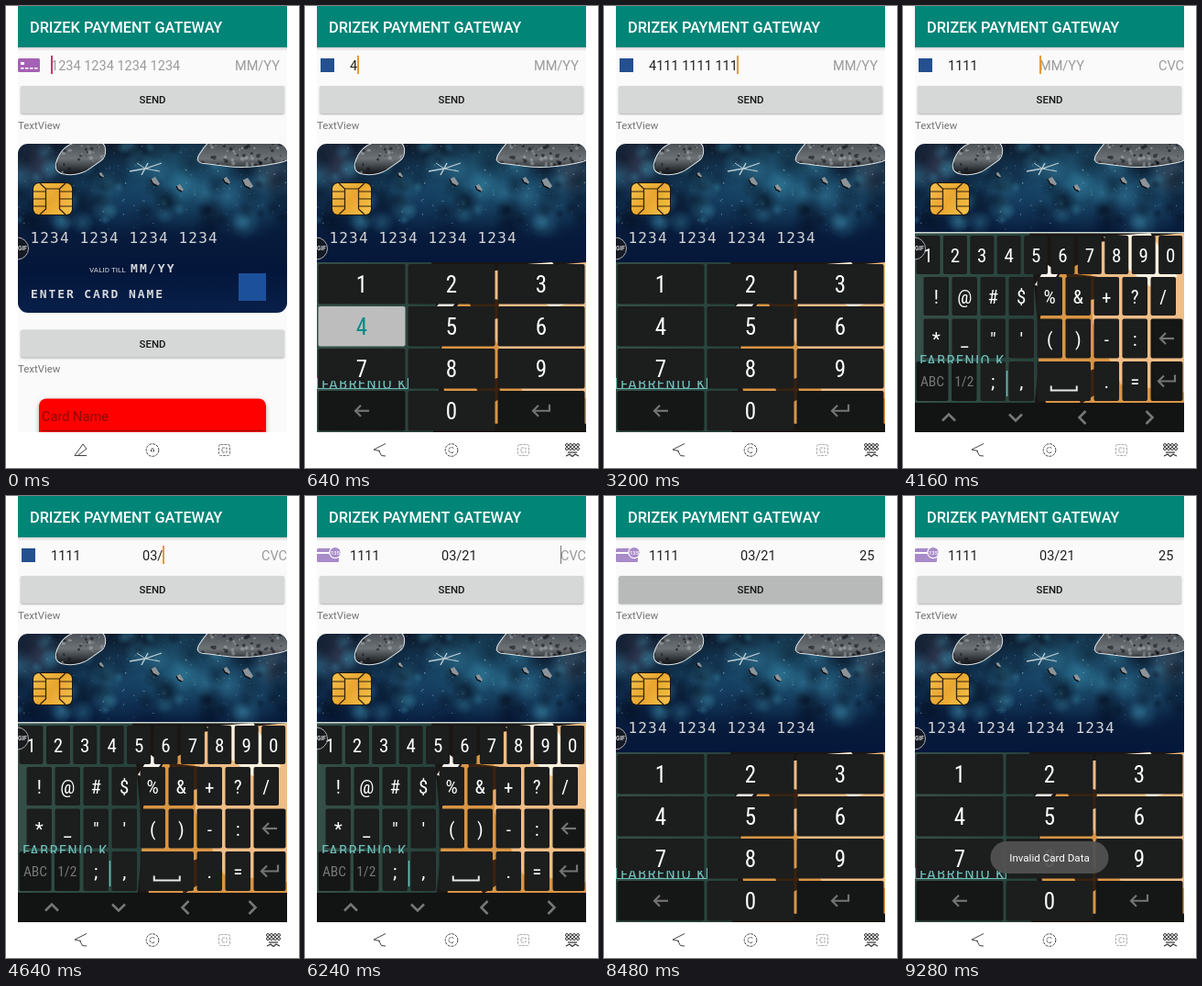
Animation of 320x503 px, one loop 9600 ms. Source, as an HTML page with a canvas:

```html
<!DOCTYPE html>
<html lang="en">
<head>
<meta charset="utf-8">
<title>Payment form</title>
<style>
html, body { margin: 0; width: 100%; height: 100%; overflow: hidden; background: #fff; }
canvas { display: block; width: 100%; height: 100%; }
</style>
</head>
<body>
<canvas id="stage"></canvas>
<script>
const W = 320, H = 503, LOOP = 9600, LEFT = 13, RIGHT = 307, NAV = 464;
const canvas = document.getElementById('stage');
const ctx = canvas.getContext('2d');
const SANS = 'Roboto, "Open Sans", sans-serif';
const NARROW = '"Roboto Condensed", Roboto, sans-serif';
const MONO = '"DejaVu Sans Mono", "Liberation Mono", monospace';
const PINK = '#d0316f', ORANGE = '#e39a35', GRAY = '#777';

// Each step patches the state from its time onwards.
const steps = [
  [0, { icon: 'card', num: '', date: '', cvc: '', field: 'num', caret: PINK, slide: 0, kb: '', lift: 0, key: '', send: false, toast: 0 }],
  [160, { kb: 'num', lift: 0.5 }],
  [320, { lift: 1 }],
  [640, { icon: 'brand', caret: ORANGE, num: '4', key: '4' }],
  [960, { key: '' }],
  [1120, { num: '41', key: '1' }],
  [1440, { num: '411', key: '' }],
  [1760, { num: '4111' }],
  [1920, { num: '4111 ' }],
  [2240, { num: '4111 1', key: '1' }],
  [2400, { num: '4111 11', key: '' }],
  [2560, { num: '4111 111', key: '1' }],
  [2880, { num: '4111 1111 1', key: '' }],
  [3040, { num: '4111 1111 11', key: '1' }],
  [3200, { num: '4111 1111 111', key: '' }],
  [3520, { num: '4111 1111 1111 1', key: '1' }],
  [3680, { num: '4111 1111 1111 11', key: '' }],
  [3840, { num: '4111 1111 1111 111', key: '1' }],
  [4000, { num: '4111 1111 1111 1111', key: '', field: 'date', slide: 0.6 }],
  [4160, { slide: 1, kb: 'sym' }],
  [4320, { date: '0', key: '0' }],
  [4480, { date: '03/', key: '3' }],
  [4640, { key: '' }],
  [5440, { caret: '' }],
  [5920, { caret: ORANGE, date: '03/2', key: '2' }],
  [6080, { date: '03/21', key: '1' }],
  [6240, { icon: 'cvc', field: 'cvc', caret: GRAY, key: '' }],
  [6560, { kb: 'num', lift: 0.75 }],
  [6720, { lift: 1 }],
  [7040, { caret: '' }],
  [7680, { caret: GRAY, cvc: '2', key: '2' }],
  [7840, { key: '' }],
  [8000, { cvc: '25', key: '5' }],
  [8160, { key: '' }],
  [8320, { caret: '' }],
  [8480, { send: true }],
  [8640, { send: false }],
  [8800, { toast: 0.3 }],
  [8960, { toast: 0.6 }],
  [9120, { toast: 0.85 }],
  [9280, { toast: 1 }]
];

function stateAt(t) {
  const s = {};
  for (const [at, patch] of steps) if (at <= t) Object.assign(s, patch);
  return s;
}

function rect(x, y, w, h, fill, r = 0) {
  ctx.fillStyle = fill;
  ctx.beginPath();
  ctx.roundRect(x, y, w, h, r);
  ctx.fill();
}

function text(str, x, y, size, color, { weight = 400, font = SANS, align = 'left', gap = 0 } = {}) {
  ctx.font = `${weight} ${size}px ${font}`;
  ctx.letterSpacing = gap + 'px';
  ctx.textAlign = align;
  ctx.fillStyle = color;
  ctx.fillText(str, x, y);
  return ctx.measureText(str).width;
}

function trace(pts, close) {
  ctx.beginPath();
  for (let i = 0; i < pts.length; i += 2) ctx.lineTo(pts[i], pts[i + 1]);
  if (close) ctx.closePath();
}

function poly(fill, ...pts) {
  trace(pts, true);
  ctx.fillStyle = fill;
  ctx.fill();
}

function line(color, width, ...pts) {
  trace(pts);
  ctx.strokeStyle = color;
  ctx.lineWidth = width;
  ctx.stroke();
}

function circle(x, y, r, fill, stroke, width = 1) {
  ctx.beginPath();
  ctx.arc(x, y, r, 0, Math.PI * 2);
  if (fill) { ctx.fillStyle = fill; ctx.fill(); }
  if (stroke) { ctx.strokeStyle = stroke; ctx.lineWidth = width; ctx.stroke(); }
}

function clipped(x, y, w, h, r, draw) {
  ctx.save();
  ctx.beginPath();
  ctx.roundRect(x, y, w, h, r);
  ctx.clip();
  draw();
  ctx.restore();
}

function gradient(x0, y0, x1, y1, ...colors) {
  const g = ctx.createLinearGradient(x0, y0, x1, y1);
  colors.forEach((c, i) => g.addColorStop(i / (colors.length - 1), c));
  return g;
}

function glow(x, y, r, rgb, alpha) {
  const g = ctx.createRadialGradient(x, y, 0, x, y, r);
  g.addColorStop(0, `rgba(${rgb},${alpha})`);
  g.addColorStop(1, `rgba(${rgb},0)`);
  ctx.fillStyle = g;
  ctx.fillRect(x - r, y - r, r * 2, r * 2);
}

function random(seed) {
  return () => (seed = seed * 16807 % 2147483647) / 2147483647;
}

function button(y, pressed) {
  ctx.save();
  ctx.shadowColor = 'rgba(0,0,0,.3)';
  ctx.shadowBlur = 2;
  ctx.shadowOffsetY = 1;
  rect(16, y, 288, 30, pressed ? '#b8b9b9' : '#d6d7d7', 2);
  ctx.restore();
  text('SEND', 160, y + 19.3, 11.43, '#151515', { weight: 500, align: 'center' });
}

function fieldIcon(kind) {
  if (kind === 'brand') return rect(17, 57, 15, 15, '#24508f');
  if (kind === 'card') {
    rect(13, 57, 24, 15, '#a561b5', 1.5);
    rect(16, 61, 4, 3, '#fff');
    for (let i = 0; i < 4; i++) rect(16 + i * 5, 67, 3.5, 1.6, '#fff');
    return;
  }
  rect(13, 57, 24, 15, '#a88bc9', 1.5);
  rect(13, 61, 24, 2, '#fafafa');
  circle(33, 61.5, 6.2, '#a88bc9', '#fff', 1.2);
  text('135', 33, 63.7, 6, '#fff', { align: 'center', weight: 500 });
}

function inputRow(s) {
  const size = 14.5, base = 70, hint = '#9b9b9b', ink = '#202020';
  const caretX = { num: 49, date: 149, cvc: 279 };
  clipped(49, 48, RIGHT - 49, 34, 0, () => {
    ctx.font = `400 ${size}px ${SANS}`;
    ctx.letterSpacing = '0px';
    const shift = s.slide * ctx.measureText('4111 1111 1111 ').width;
    const w = text(s.num || '1234 1234 1234 1234', 49 - shift, base, size, s.num ? ink : hint);
    if (s.num) caretX.num = 49 + w - shift;
    const dateX = 250 - 101 * s.slide;
    const dw = text(s.date || 'MM/YY', dateX, base, size, s.date ? ink : hint);
    caretX.date = dateX + (s.date ? dw : 0);
    const cvcX = 320 - 41 * s.slide;
    const cw = text(s.cvc || 'CVC', cvcX, base, size, s.cvc ? ink : hint);
    caretX.cvc = cvcX + (s.cvc ? cw : 0);
  });
  if (s.caret) rect(Math.floor(caretX[s.field]), 54, s.field === 'cvc' ? 1 : 2, 20, s.caret);
  fieldIcon(s.icon);
}

// Smooth closed outline through the midpoints of a few corners.
function rock(seed, ...pts) {
  const n = pts.length / 2;
  const at = i => [pts[(i % n) * 2], pts[(i % n) * 2 + 1]];
  const mid = i => at(i).map((v, k) => (v + at(i + 1)[k]) / 2);
  ctx.save();
  ctx.beginPath();
  ctx.moveTo(...mid(0));
  for (let i = 1; i <= n; i++) ctx.quadraticCurveTo(...at(i), ...mid(i));
  ctx.strokeStyle = '#dfe5e8';
  ctx.lineWidth = 2;
  ctx.stroke();
  ctx.fillStyle = gradient(0, 150, 0, 182, '#4b5156', '#6d7276', '#14181c');
  ctx.fill();
  ctx.clip();
  const rnd = random(seed), [x0, y0] = at(0);
  for (let i = 0; i < 120; i++) {
    const x = x0 - 15 + rnd() * 125, y = 150 + rnd() * 32;
    circle(x, y, 0.5 + rnd() * 1.8, rnd() < 0.55 ? 'rgba(15,18,22,.55)' : 'rgba(170,175,178,.5)');
  }
  ctx.restore();
}

function space() {
  rect(13, 150, 294, 184, gradient(0, 150, 0, 334, '#0d1c2e', '#123350', '#081c3c', '#04163a', '#08204a'));
  glow(190, 188, 62, '45,125,160', 0.6);
  glow(262, 205, 52, '40,105,140', 0.55);
  glow(125, 205, 48, '28,85,125', 0.5);
  glow(35, 172, 34, '80,70,95', 0.45);
  glow(292, 184, 26, '95,110,125', 0.5);
  const rnd = random(41);
  for (let i = 0; i < 90; i++) {
    const x = 13 + rnd() * 294, y = 150 + rnd() * 88, r = 5 + rnd() * 14;
    glow(x, y, r, rnd() < 0.6 ? '4,12,26' : '60,140,170', 0.38);
  }
  for (let i = 0; i < 240; i++) {
    const x = 13 + rnd() * 294, y = 150 + rnd() * 95, d = 0.5 + rnd() * 0.8;
    rect(x, y, d, d, `rgba(170,210,225,${rnd() * 0.6})`);
  }
  rock(7, 53, 182, 57, 162, 72, 148, 107, 146, 109, 164, 98, 172, 80, 184);
  rock(23, 206, 170, 218, 152, 230, 140, 312, 140, 314, 166, 292, 172, 256, 176, 226, 172);
  const rocks = [[163, 191, 5], [190, 198, 4], [241, 190, 4], [264, 193, 6], [104, 184, 3]];
  for (const [x, y, r] of rocks) {
    poly('#8d9499', x - r, y - r / 2, x, y - r, x + r, y + r / 2, x + r / 2, y + r, x - r / 2, y + r / 2);
    line('#0c1014', 1.4, x - r, y - r / 2, x - r / 2, y + r / 2, x + r / 2, y + r);
  }
  const steel = '#b9cbd3';
  line(steel, 1.3, 135, 180, 152, 177, 170, 171);
  line(steel, 1, 143, 171, 152, 177, 168, 180);
  line(steel, 1.5, 148, 184, 155, 171);
}

function chip() {
  rect(29, 192, 44, 36, '#1c1710', 7);
  rect(30, 193, 42, 34, gradient(30, 193, 72, 227, '#f4c04c', '#e9a62f', '#f5c34d'), 6);
  const ink = '#33240f';
  for (const y of [202, 210, 218]) {
    line(ink, 1.2, 30, y, 43.5, y);
    line(ink, 1.2, 58.5, y, 72, y);
  }
  line(ink, 1.3, 37, 193, 43.5, 199, 43.5, 221, 37, 227);
  line(ink, 1.3, 65, 193, 58.5, 199, 58.5, 221, 65, 227);
  line(ink, 1.1, 43.5, 199, 58.5, 199);
}

function bankCard() {
  clipped(13, 150, 294, 184, 11, () => {
    space();
    chip();
    const mono = (gap, weight = 700) => ({ weight, font: MONO, gap });
    text('1234 1234 1234 1234', 26.5, 258, 16, '#d3d5d7', mono(1.17, 400));
    text('VALID TILL', 91, 290, 8.1, '#d5d9df');
    text('MM/YY', 136, 290, 13, '#d5d8dc', mono(2.1));
    text('ENTER CARD NAME', 27, 318, 13, '#d5d8dc', mono(1.9));
    rect(254, 291, 30, 30, '#1d509b');
  });
}

function page(s) {
  rect(LEFT, 0, 294, NAV, '#fafafa');
  rect(LEFT, 45, 294, 4, gradient(0, 45, 0, 49, 'rgba(0,0,0,.16)', 'rgba(0,0,0,0)'));
  rect(LEFT, 0, 294, 45, '#008577');
  text('DRIZEK PAYMENT GATEWAY', 26, 29, 16.33, '#fff', { weight: 500 });
  inputRow(s);
  button(87, s.send);
  text('TextView', 13, 134, 11.43, '#757575');
  bankCard();
  button(352.5, false);
  text('TextView', 13, 399, 11.43, '#757575');
  clipped(LEFT, 415, 294, NAV - 415, 0, () => {
    ctx.save();
    ctx.shadowColor = 'rgba(0,0,0,.35)';
    ctx.shadowBlur = 5;
    ctx.shadowOffsetY = 2;
    rect(36, 427.5, 248, 70, '#f00', 8);
    ctx.restore();
    text('Card Name', 39, 451.5, 14.6, '#8f0808');
    rect(39, 462, 242, 1, '#8f0808');
  });
}

function wallpaper(top) {
  const h = NAV - top;
  const y = f => top + f * h;
  rect(LEFT, top, 294, h, gradient(13, 0, 150, 0, '#354f48', '#2c4941', '#26403a'));
  poly('#1b1613', 138, y(0), 307, y(0), 307, y(1), 140, y(1), 150, y(0.6));
  poly('#d99545', 150, y(0.42), 172, y(0.2), 209, y(0.12), 307, y(0.15), 307, y(0.95), 160, y(0.95), 148, y(0.66));
  poly('#f0bd86', 206, y(0.05), 307, y(0), 307, y(0.8), 238, y(0.76), 207, y(0.45));
  poly('#fff1df', 219, y(0.02), 270, y(0), 300, y(0.22), 270, y(0.27), 243, y(0.17));
  poly('#f7f3ec', 144, y(0.26), 158, y(0.16), 170, y(0.2), 157, y(0.29));
  poly('#3a2210', 178, y(0.2), 212, y(0.22), 211, y(0.33), 186, y(0.36));
  poly('#3a2210', 186, y(0.72), 211, y(0.68), 214, y(0.8), 194, y(0.86));
}

// Wallpaper lettering that shows between two rows of keys.
function lettering(y, base) {
  clipped(LEFT, y, 100, 10, 0, () => text('FABRENIO K', 18, base, 17, '#6fbdb9', { font: NARROW, gap: 1.2 }));
}

function arrowKey(x, y, enter) {
  const c = '#747474';
  if (enter) line(c, 2.2, x + 9, y - 7, x + 9, y, x - 9, y);
  else line(c, 2.2, x - 7, y, x + 8, y);
  const tip = x - (enter ? 9 : 7);
  line(c, 2.2, tip + 6, y - 6, tip, y, tip + 6, y + 6);
}

function key(label, x, y, w, h, size, pressed, dim) {
  rect(x, y, w, h, pressed ? '#bdbdbd' : dim ? '#151616' : '#1c1d1d', 2);
  const cx = x + w / 2, cy = y + h / 2;
  if (label === '←' || label === '↵') arrowKey(cx, cy, label === '↵');
  else if (label === ' ') line('#e8e8e8', 2, cx - 14, cy + 5, cx - 14, cy + 10, cx + 14, cy + 10, cx + 14, cy + 5);
  else {
    const ink = pressed ? '#008b88' : dim ? '#777' : '#fff';
    text(label, cx, cy + size * 0.36, size, ink, { align: 'center', font: NARROW });
  }
}

function numericPad(pressed) {
  wallpaper(279);
  [...'123456789←0↵'].forEach((k, i) => {
    const x = 14.5 + (i % 3) * 98, y = 281 + Math.floor(i / 3) * 46;
    key(k, x, y, 95, 43.5, 25, k === pressed, k === '←' || k === '↵');
  });
  lettering(408, 417);
  line('#6fbdb9', 1, 13.5, 405, 13.5, 416.5, 112.5, 416.5, 112.5, 405);
}

function symbolPad(pressed) {
  wallpaper(247);
  rect(LEFT, 246, 294, 1.5, '#c9d6d2');
  [...'1234567890'].forEach((k, i) => key(k, 14.5 + i * 29.4, 250, 26, 42, 21, k === pressed));
  const row = (keys, x, y) => [...keys].forEach((k, i) => key(k, x + i * 31, y, 27.5, y < 300 ? 42 : 43, 21));
  row('!@#$%&+?/', 22.5, 295);
  row('*_"\'()-:', 22.5, 340.5);
  key('←', 270.5, 340.5, 35, 43, 21, false, true);
  key('ABC', 14.5, 387, 35, 43, 15.5, false, true);
  key('1/2', 53, 387, 27.5, 43, 15.5, false, true);
  row(';,', 84.5, 387);
  key(' ', 146.5, 387, 58.5, 43, 21);
  row('.=', 208.5, 387);
  key('↵', 270.5, 387, 35, 43, 21, false, true);
  lettering(379, 392);
  line('#6fbdb9', 1.5, 113.5, 397, 113.5, 425);
  rect(LEFT, 432, 294, 32, '#121313');
  [50, 123, 196, 269].forEach((x, i) => {
    ctx.save();
    ctx.translate(x, 448);
    ctx.rotate([0, Math.PI, -Math.PI / 2, Math.PI / 2][i]);
    line('#777', 2.6, -7, 3.5, 0, -3.5, 7, 3.5);
    ctx.restore();
  });
}

function keyboard(s) {
  if (!s.kb) return;
  clipped(LEFT, 240, 294, NAV - 240, 0, () => {
    ctx.translate(0, (1 - s.lift) * 185);
    if (s.kb === 'num') numericPad(s.key);
    else symbolPad(s.key);
  });
}

function recorderBadge() {
  clipped(LEFT, 248, 20, 34, 0, () => {
    circle(12.5, 264, 12, 'rgba(25,28,32,.8)', '#aaa', 1);
    text('GIF', 13, 266.4, 6.6, '#eee', { weight: 500 });
  });
}

function toast(alpha) {
  if (!alpha) return;
  ctx.save();
  ctx.globalAlpha = alpha;
  rect(95.5, 376, 129, 35, 'rgba(82,82,82,.95)', 17.5);
  text('Invalid Card Data', 160, 397.6, 11.6, '#fff', { align: 'center' });
  ctx.restore();
}

function navBar(open) {
  const ink = '#444';
  rect(0, NAV, W, H - NAV, '#fff');
  if (open) {
    line(ink, 1, 88, 476.5, 75, 483, 82, 484.5);
    line(ink, 1, 80.5, 484, 83.5, 489.5, 88, 490);
  } else line(ink, 1, 88, 489.5, 75, 489.5, 84, 477, 88, 482, 79, 489);
  ctx.save();
  ctx.setLineDash([3, 1]);
  circle(160, 483.5, 6.8, null, ink);
  ctx.beginPath();
  if (open) ctx.arc(160, 483.5, 3, 0.7, 5.6);
  else ctx.rect(158.5, 482, 3, 3);
  ctx.stroke();
  ctx.beginPath();
  ctx.roundRect(232.5, 477.5, 12, 12, 2);
  ctx.rect(236, 481, 5, 5);
  ctx.strokeStyle = open ? '#aaa' : '#777';
  ctx.stroke();
  ctx.restore();
  if (!open) return;
  for (let i = 0; i < 8; i++) circle(286 + (i % 4) * 4, 478 + Math.floor(i / 4) * 4, 1.5, null, '#333');
  line('#333', 1.2, 287, 486, 297, 486);
  line('#333', 1.2, 285, 490, 289, 488, 292, 490.5, 295, 488, 299, 490);
}

function resize() {
  const dpr = window.devicePixelRatio || 1;
  canvas.width = Math.round(innerWidth * dpr);
  canvas.height = Math.round(innerHeight * dpr);
}

function frame() {
  const s = stateAt(performance.now() % LOOP);
  ctx.setTransform(canvas.width / W, 0, 0, canvas.height / H, 0, 0);
  rect(0, 0, W, H, '#fff');
  page(s);
  keyboard(s);
  recorderBadge();
  toast(s.toast);
  navBar(Boolean(s.kb));
  requestAnimationFrame(frame);
}

addEventListener('resize', resize);
resize();
frame();
</script>
</body>
</html>
```
